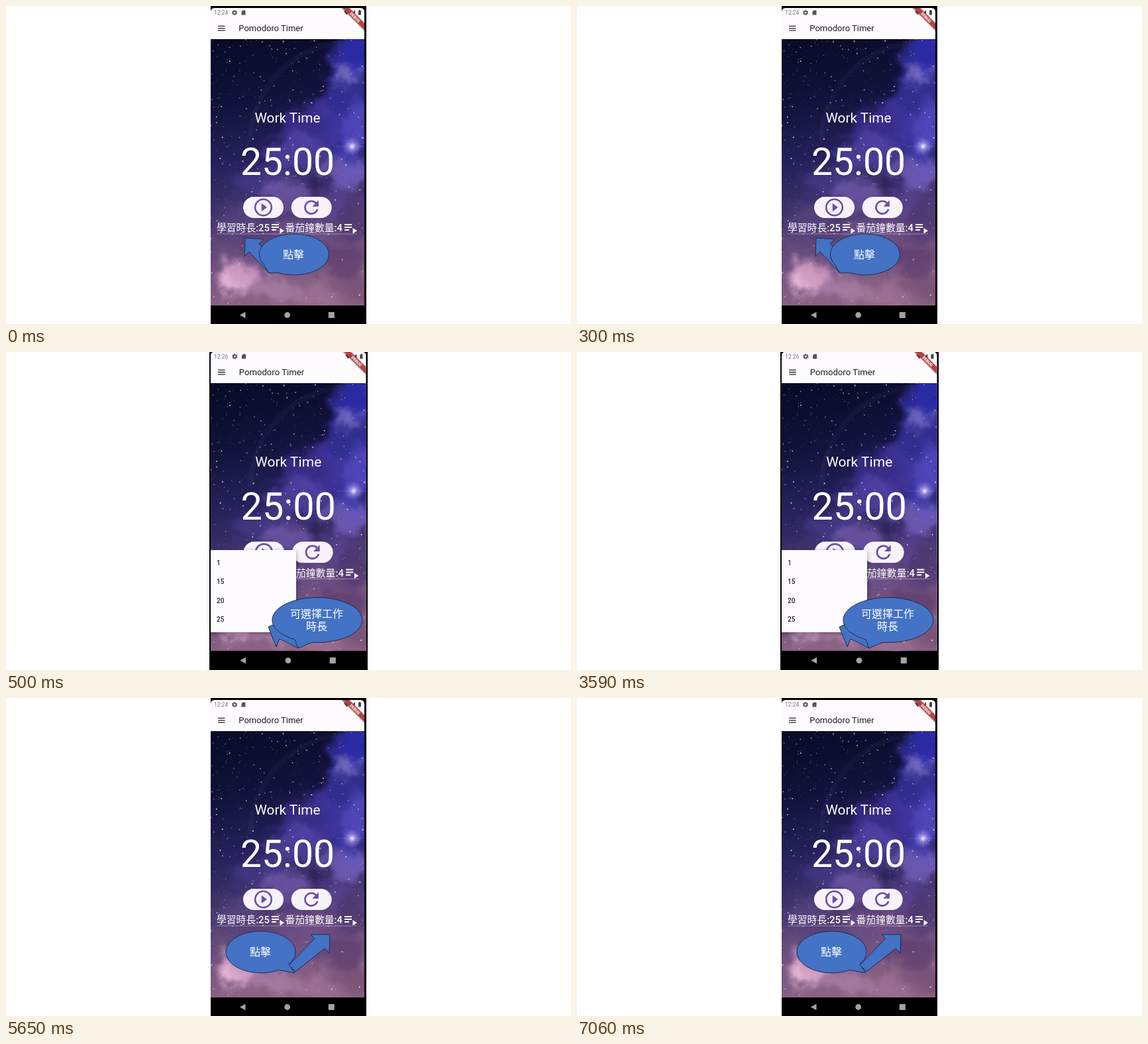
Recreate the animation shown at these times as an HTML page. Size 853x480 px, loop 8 s.

```html
<!DOCTYPE html>
<html lang="zh-Hant">
<head>
<meta charset="utf-8">
<title>Pomodoro Timer</title>
<style>
  html, body { margin: 0; width: 100%; height: 100%; overflow: hidden; background: #fff; }
  svg { display: block; width: 100%; height: 100%; }
  text { font-family: Roboto, "Noto Sans CJK TC", "Noto Sans CJK", sans-serif; }
  .mid { text-anchor: middle; }
  .bubble { fill: #4472c4; stroke: #1c2d4f; stroke-width: 1; stroke-linejoin: round; }
  .say { fill: #fff; font-size: 16px; text-anchor: middle; }
  .row { fill: #fff; font-size: 14.8px; font-weight: 500; }
  .menu { fill: #222; font-size: 10px; font-weight: 500; }
</style>
</head>
<body>
<svg viewBox="0 0 853 480">
  <defs>
    <linearGradient id="sky" x2="0.12" y2="1">
      <stop offset="0" stop-color="#070a26"/>
      <stop offset=".25" stop-color="#11123a"/>
      <stop offset=".48" stop-color="#25225c"/>
      <stop offset=".68" stop-color="#43346c"/>
      <stop offset=".85" stop-color="#705080"/>
      <stop offset="1" stop-color="#8a6284"/>
    </linearGradient>
    <radialGradient id="glow">
      <stop offset="0" stop-color="#fff"/>
      <stop offset=".22" stop-color="#e4dcff" stop-opacity=".9"/>
      <stop offset="1" stop-color="#9a86f0" stop-opacity="0"/>
    </radialGradient>
    <filter id="cloud" filterUnits="userSpaceOnUse" x="280" y="20" width="290" height="460" color-interpolation-filters="sRGB">
      <feGaussianBlur stdDeviation="7" result="soft"/>
      <feTurbulence type="fractalNoise" baseFrequency=".03" numOctaves="5" seed="8"/>
      <feDisplacementMap in="soft" scale="42" xChannelSelector="R" yChannelSelector="G"/>
    </filter>
    <filter id="shade" x="-10%" y="-10%" width="120%" height="125%">
      <feDropShadow dx="0" dy="2" stdDeviation="3" flood-opacity=".4"/>
    </filter>
    <clipPath id="photo"><rect x="309" y="50" width="232" height="402"/></clipPath>
    <clipPath id="screen"><path d="M309 452V9q0-6 6-6H535q6 0 6 6V452Z"/></clipPath>
    <g id="list" fill="#fff">
      <path d="M1 1H12V3H1ZM1 5H12V7H1ZM1 9H8V11H1ZM13.5 7L20 11.3L13.5 15.5Z"/>
    </g>
  </defs>

  <rect id="body" y="0" height="480"/>

  <g id="phone">
    <path d="M309 452V9q0-6 6-6H535q6 0 6 6V452Z" fill="#fefbff"/>
    <g clip-path="url(#photo)">
      <rect x="309" y="50" width="232" height="402" fill="url(#sky)"/>
      <g id="nebula" filter="url(#cloud)"/>
      <path d="M368 205C372 130 424 65 505 55" fill="none" stroke="#7779b8" stroke-opacity=".07" stroke-width="8"/>
      <g id="stars" fill="#e2e2fc"/>
      <circle cx="522.5" cy="212" r="15" fill="url(#glow)" opacity=".6"/>
      <circle cx="522.5" cy="212" r="6" fill="url(#glow)"/>
      <path d="M498 212H541M522.5 199V226" stroke="#cfc4ff" stroke-opacity=".25" stroke-width=".8"/>
    </g>

    <g fill="#666">
      <text id="clock" x="314" y="13" font-size="8.5" fill="#777"></text>
      <circle cx="345" cy="10" r="2.4" fill="none" stroke="#555" stroke-width="1.8"/>
      <circle cx="345" cy="10" r="3.6" fill="none" stroke="#555" stroke-width="1" stroke-dasharray="1.9"/>
      <path d="M355.5 8.5L357.5 6.5H361.5V13.5H355.5Z" fill="#555"/>
      <path d="M510 8Q514.5 4.5 519 8L514.5 13.5ZM527 6V13.5H519.5ZM532 7H533V6H535V7H536V13.5H532Z" fill="#444"/>
    </g>
    <g clip-path="url(#screen)">
      <g transform="translate(527 17) rotate(45)">
        <rect x="-35" y="-3.7" width="70" height="7.4" fill="#b3423f" filter="url(#shade)"/>
        <text class="mid" y="2.2" font-size="6" font-weight="800" fill="#fff">DEBUG</text>
      </g>
    </g>
    <path d="M320 30.3H330.5M320 33.6H330.5M320 36.9H330.5" stroke="#222" stroke-width="1.3"/>
    <text x="351.3" y="38" font-size="13" fill="#1d1b20">Pomodoro Timer</text>

    <text class="mid" x="425" y="175.5" font-size="20.8" fill="#fff">Work Time</text>
    <text class="mid" x="425" y="255" font-size="57" fill="#fff">25:00</text>

    <g fill="#f8f3fb">
      <rect x="358" y="288" width="61" height="32" rx="16"/>
      <rect x="430.7" y="288" width="61" height="32" rx="16"/>
    </g>
    <g fill="#6750a4">
      <circle cx="388.5" cy="304" r="12.3" fill="none" stroke="#6750a4" stroke-width="2.6"/>
      <path d="M385.8 297.8V310.2L394 304Z"/>
      <path transform="translate(444.7 287.7) scale(1.36)" d="M17.65 6.35C16.2 4.9 14.21 4 12 4c-4.42 0-7.99 3.58-7.99 8s3.57 8 7.99 8c3.73 0 6.84-2.55 7.73-6h-2.08c-.82 2.33-3.04 4-5.65 4-3.31 0-6-2.69-6-6s2.69-6 6-6c1.66 0 3.14.69 4.22 1.78L13 11h7V4l-2.35 2.35z"/>
    </g>

    <text class="row" x="318" y="340.3">學習時長:25</text>
    <text class="row" x="421.5" y="340.3">番茄鐘數量:4</text>
    <use href="#list" x="400" y="328"/>
    <use href="#list" x="510" y="328"/>
    <path d="M318 344H420M422 344H530" stroke="#ddd4e6" stroke-opacity=".6" stroke-width=".8"/>

    <g fill="#a3a3a3">
      <path d="M352.8 466.5L361.5 461.7V471.3Z"/>
      <circle cx="424.7" cy="466.5" r="4.4"/>
      <rect x="486.8" y="462" width="9" height="9"/>
    </g>
  </g>

  <g class="scene">
    <path class="bubble" d="M361 350L389 352L382 359L412 389L397 403L367 371L360 378Z"/>
    <path class="bubble" d="M397 403L388.5 389.4A52.5 31 0 1 1 411.5 402.7Z"/>
    <text class="say" x="434" y="381">點擊</text>
  </g>

  <g class="scene">
    <rect x="309" y="299" width="129" height="124" fill="#fefbff" filter="url(#shade)"/>
    <text class="menu" x="318" y="321.5">1</text>
    <text class="menu" x="318" y="350">15</text>
    <text class="menu" x="318" y="378.7">20</text>
    <text class="menu" x="318" y="407.3">25</text>
    <path class="bubble" d="M396 415L420 404L440 420L441 447L413 433L408 445Z"/>
    <path class="bubble" d="M441 447L436 434A68 34 0 1 1 462 438.3Z"/>
    <text class="say" x="469" y="401">可選擇工作</text>
    <text class="say" x="469" y="420">時長</text>
  </g>

  <g class="scene">
    <path class="bubble" d="M436 415L411.5 410.5A52.5 31.5 0 1 1 427 402Z"/>
    <path class="bubble" d="M489 357L488 385L481 378L437 413L427 403L466 363L460 357Z"/>
    <text class="say" x="384" y="389">點擊</text>
  </g>
</svg>
<script>
const byId = id => document.getElementById(id);
const add = (parent, tag, attrs) => {
  const node = document.createElementNS("http://www.w3.org/2000/svg", tag);
  for (const key in attrs) node.setAttribute(key, attrs[key]);
  parent.append(node);
};

// x, y, rx, ry, colour, opacity
const clouds = [
  [520, 145, 42, 105, "#3a36a8", .75],
  [535, 70, 30, 30, "#2a2ab4", .65],
  [516, 105, 18, 14, "#8f82d4", .7],
  [465, 185, 50, 36, "#43369e", .7],
  [438, 222, 45, 28, "#5d49b0", .65],
  [530, 180, 22, 40, "#6254d0", .6],
  [385, 265, 45, 26, "#4b3f92", .6],
  [512, 250, 36, 24, "#7e68cc", .7],
  [420, 282, 36, 22, "#7c62b4", .65],
  [465, 272, 24, 14, "#2a2058", .7],
  [500, 295, 28, 20, "#5f49a2", .55],
  [345, 325, 34, 26, "#5c4a84", .6],
  [445, 340, 46, 24, "#72548c", .6],
  [525, 330, 26, 28, "#4a3470", .6],
  [345, 408, 30, 24, "#dca6cc", .85],
  [338, 420, 15, 11, "#f2c8e0", .7],
  [400, 425, 40, 20, "#b488b0", .65],
  [330, 370, 24, 14, "#67507c", .6],
  [505, 385, 38, 24, "#58396a", .65],
  [465, 435, 34, 14, "#a8789c", .6],
  [525, 425, 20, 22, "#704a70", .6]
];
for (const [cx, cy, rx, ry, fill, opacity] of clouds)
  add(byId("nebula"), "ellipse", { cx, cy, rx, ry, fill, opacity });

let seed = 41;
const random = () => (seed = seed * 16807 % 2147483647) / 2147483647;
for (let i = 0; i < 600; i++) {
  const cx = 309 + 232 * random() ** 1.4;
  const cy = 50 + 400 * random() ** 1.2;
  add(byId("stars"), "circle", { cx, cy, r: .35 + .8 * random() ** 3, opacity: .3 + .65 * random() });
}

const scenes = [...document.querySelectorAll(".scene")];
let shown = -1;
function show(index) {
  if (index === shown) return;
  shown = index;
  const menuOpen = index === 1;
  scenes.forEach((scene, i) => scene.style.display = i === index ? "" : "none");
  byId("body").setAttribute("x", menuOpen ? 307 : 309);
  byId("body").setAttribute("width", menuOpen ? 239 : 235);
  byId("phone").setAttribute("transform",
    menuOpen ? "translate(309 47) scale(1.0108 1.005) translate(-309 -50)" : "");
  byId("clock").textContent = menuOpen ? "12:26" : "12:24";
}

function tick() {
  const time = performance.now() % 8000;
  show(time < 500 ? 0 : time < 5650 ? 1 : 2);
  requestAnimationFrame(tick);
}
tick();
</script>
</body>
</html>
```
